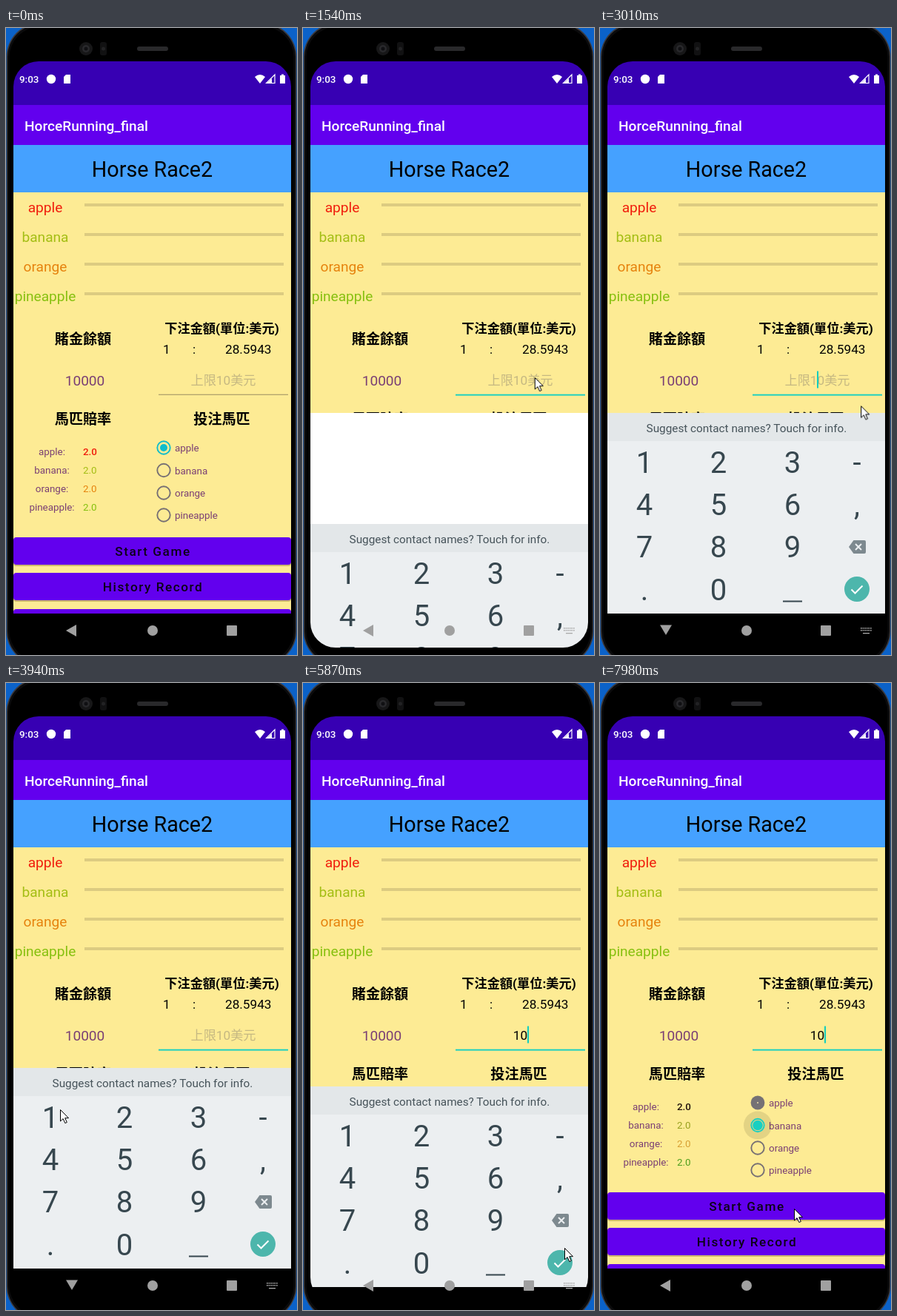
Animation of 393x847 px, one loop 8000 ms. Source, as an HTML page:

```html
<!DOCTYPE html>
<html lang="zh-Hant">
<head>
<meta charset="utf-8">
<title>Horse race</title>
<style>
html, body { margin: 0; width: 100%; height: 100%; overflow: hidden; background: #0b62c9; }
svg { display: block; width: 393px; height: 847px; }
text { font-family: Roboto, "Noto Sans CJK TC", "Noto Sans CJK JP", "Noto Sans CJK", sans-serif; white-space: pre; }
.mid { text-anchor: middle; }
.h1 { font-size: 28.7px; }
.big { font-size: 19.1px; }
.med { font-size: 17.2px; }
.small { font-size: 13.4px; }
.bar { font-size: 15.3px; fill: #46535a; }
.key { font-size: 40px; fill: #37474f; text-anchor: middle; }
.bold { font-weight: 700; }
.half { font-weight: 500; }
.btn { font-size: 17.2px; font-weight: 500; letter-spacing: 1.54px; fill: #0c0218; }
.plum { fill: #7a3f74; }
</style>
</head>
<body>
<svg id="stage" viewBox="0 0 393 847"></svg>
<script>
const LOOP = 8000;
const names = ['apple', 'banana', 'orange', 'pineapple'];
const colors = ['#f01d0c', '#a4be14', '#e6830e', '#86c00f'];
const lateColors = ['#22120c', '#99a11f', '#d8a034', '#4f9f1d'];
const radioY = [567, 597.5, 628, 658];

const text = (x, y, cls, str, extra = '') => `<text x="${x}" y="${y}" class="${cls}" ${extra}>${str}</text>`;
const rect = (x, y, w, h, fill, extra = '') => `<rect x="${x}" y="${y}" width="${w}" height="${h}" fill="${fill}" ${extra}/>`;
const disc = (x, y, r, fill, extra = '') => `<circle cx="${x}" cy="${y}" r="${r}" fill="${fill}" ${extra}/>`;
const path = (d, fill, extra = '') => `<path d="${d}" fill="${fill}" ${extra}/>`;
const group = (id, body, extra = '') => `<g id="${id}" ${extra}>${body}</g>`;
const ring = (y, color) => disc(213, y, 8.7, 'none', `stroke="${color}" stroke-width="1.9"`);

const body = [
  rect(0.5, -7, 392, 868, '#3b3b40', 'rx="46"'),
  rect(2, -5, 389, 864, '#0b0b0c', 'rx="44"'),
  rect(4.5, -2, 384, 858, '#000', 'rx="42"'),
  disc(108, 28, 9, '#171718'), disc(108, 28, 5, '#29292c'), disc(108, 28, 2.5, '#101013'),
  rect(127, 19, 9, 18, '#111112', 'rx="3"'), disc(131.5, 28, 2.5, '#222224'),
  rect(177, 25, 42, 6, '#29292b', 'rx="3"'),
].join('');

const statusBar = [
  rect(10, 45, 375, 59, '#3700b3'),
  text(18, 74, 'small half', '9:03', 'fill="#fff"'),
  disc(61, 69, 6.2, '#fff'),
  path('M81 63h6v12h-9v-9z', '#fff'),
  path('M336 66q7-6 14 0l-7 9z', '#fff'),
  path('M351.500 74.500L363 63v11.500z', 'none', 'stroke="#fff" stroke-width="1.2"'),
  path('M352 75l7-7v7z', '#fff'),
  path('M370 64h2v-1.500h3v1.500h2v11h-7z', '#fff'),
].join('');

const button = (y, label) =>
  rect(10, y + 2, 375, 37, '#b8a35c', 'rx="4" opacity=".7"') +
  rect(10, y, 375, 37, '#6200ee', 'rx="4"') + text(198.5, y + 25, 'btn mid', label);

const content = [
  rect(10, 222, 375, 569, '#fdeb94'),
  rect(10, 104, 375, 54, '#6200ee'),
  text(25, 139, 'big half', 'HorceRunning_final', 'fill="#fff"'),
  rect(10, 158, 375, 64, '#45a1ff'),
  text(197.5, 201, 'h1 mid', 'Horse Race2'),
  names.map((n, i) => text(53, 249 + i * 40, 'big mid', n, `fill="${colors[i]}"`) +
    rect(106, 237 + i * 40, 269, 4, '#dccb81')).join(''),
  text(104, 427, 'big mid bold', '賭金餘額'),
  text(291.5, 412, 'med mid bold', '下注金額(單位:美元)'),
  text(212, 440, 'med', '1'), text(252, 440, 'med', ':'), text(296, 440, 'med', '28.5943'),
  text(106.5, 483, 'big mid plum', '10000'),
  text(293.5, 482, 'med mid', '上限10美元', 'id="hint" fill="#c5b882"'),
  text(293.5, 482, 'med mid', '1', 'id="one"'),
  text(293.5, 482, 'med mid', '10', 'id="ten"'),
  rect(206, 494.7, 175, 1.2, '#aa9d6a', 'id="idleLine"'),
  rect(206, 494.7, 175, 1.9, '#18cfc2', 'id="focusLine"'),
  rect(-1, 463.5, 2, 23, '#12cdbf', 'id="caret"'),
  text(104, 535, 'big mid bold', '馬匹賠率'),
  text(291.5, 535, 'big mid bold', '投注馬匹'),
  names.map((n, i) => text(62, 577 + i * 25.1, 'small mid plum', n + ':') +
    text(104, 577 + i * 25.1, 'small' + (i ? '' : ' half'), '2.0', `id="odd${i}"`) +
    text(228, radioY[i] + 5, 'small plum', n)).join(''),
  ring(628, '#777074'), ring(658, '#777074'),
  group('appleOn', disc(213, 567, 5, 'currentColor') + ring(567, 'currentColor')),
  group('appleOff', disc(213, 567, 9.4, '#757175') + disc(213, 567, 1, '#eee0a8')),
  group('bananaOff', ring(597.5, '#777074')),
  group('bananaOn', disc(213, 597.5, 19, '#000', 'id="ripple" opacity=".1"') +
    disc(213, 597.5, 6.8, '#18cfc2') + ring(597.5, '#18cfc2')),
  button(688, 'Start Game'), button(736, 'History Record'),
  rect(10, 785, 375, 10, '#6200ee', 'rx="4"'),
  rect(10, 791, 375, 50, '#000'),
].join('');

const rowY = [587, 644, 701, 759];
const keyRows = ['123-', '456,', '789', '.0'];
const keyboard = [
  rect(10, 520, 375, 38, '#e3e7e9'), rect(10, 558, 375, 233, '#eceff1'),
  rect(10, 791, 375, 60, '#000'),
  text(198, 546, 'bar mid', 'Suggest contact names? Touch for info.'),
  rect(13, 561, 94, 51, '#cfd5d8', 'id="press1" rx="3"'),
  rect(113, 733, 94, 51, '#cfd5d8', 'id="press0" rx="3"'),
  keyRows.map((row, r) => [...row].map((k, c) =>
    text([60, 160, 260, 347][c], rowY[r] + 14, 'key', k)).join('')).join(''),
  rect(247, 773.5, 26, 2, '#37474f'),
  path('M336 701l6.500-9H357q2 0 2 2v14q0 2-2 2H342.500z', '#7d898f'),
  path('M345 697l8 8m0-8l-8 8', 'none', 'stroke="#eceff1" stroke-width="2"'),
  disc(347, 758, 25, '#cfd5d8', 'id="pressOk"'),
  disc(347, 758, 17, '#4db6ac'),
  path('M339.500 758.500l5 5 10-10', 'none', 'stroke="#fff" stroke-width="2"'),
].join('');

let dots = rect(355, 817, 9, 1.3, '#aaa');
for (let i = 0; i < 12; i++) dots += rect(352 + i % 6 * 2.6, 810 + (i / 6 | 0) * 3, 1.6, 1.6, '#aaa');
const nav = [
  path('M81 814l14-8v16z', '#a0a0a0', 'id="back"'),
  path('M81 806.500h16l-8 13.500z', '#a0a0a0', 'id="down"'),
  disc(198, 814, 7, '#a0a0a0'), rect(298, 807, 14, 14, '#a0a0a0', 'rx="1"'),
  group('keysIcon', dots),
].join('');

document.getElementById('stage').innerHTML =
  `<clipPath id="screen"><rect x="10" y="45" width="375" height="792" rx="34"/></clipPath>` + body +
  `<g clip-path="url(#screen)">${statusBar}${content}` +
  rect(10, 520, 375, 271, '#fff', 'id="blank"') + group('keyboard', keyboard) + nav + '</g>' +
  group('cursor', disc(0, 0, 12, '#ff0', 'id="click" opacity=".47"') +
    path('M.5 .5V16l3.600-3.400 2.700 6 2.500-1.100-2.600-5.800H11.500z', '#fff', 'stroke="#000" stroke-width="1"'));

function run(id, prop, steps, easing = 'step-end') {
  const frames = steps.map(([ms, v]) => ({ offset: ms / LOOP, [prop]: v, easing }));
  if (steps[0][0] > 0) frames.unshift({ ...frames[0], offset: 0 });
  frames.push({ ...frames[frames.length - 1], offset: 1 });
  document.getElementById(id).animate(frames, { duration: LOOP, iterations: Infinity });
}

// Times alternate: shown from, hidden from, shown from ...
const show = (id, ...times) => run(id, 'visibility',
  [[0, 'hidden'], ...times.map((ms, i) => [ms, i % 2 ? 'hidden' : 'visible'])]);
const move = (id, points, easing) =>
  run(id, 'transform', points.map(([ms, x, y]) => [ms, `translate(${x}px, ${y}px)`]), easing);

show('cursor', 140);
move('cursor', [
  [140, 329, 797], [300, 326, 700], [520, 312, 510], [670, 306, 468], [1500, 306, 468],
  [1690, 337, 486], [1780, 337, 486], [1860, 353, 510], [3010, 353, 510],
  [3390, 42, 616], [3560, 42, 616], [3940, 73, 576], [4080, 73, 576],
  [4320, 133, 692], [4400, 150, 730], [4480, 167, 764], [4780, 167, 764],
  [4940, 317, 762], [5020, 317, 762], [5250, 353, 763], [5950, 353, 763],
  [6500, 267, 628], [6640, 267, 628], [6800, 251, 598], [6960, 251, 598],
  [7180, 303, 645], [7340, 293, 679], [7580, 293, 679], [7900, 262, 710],
], 'linear');
show('click', 920, 1070, 4010, 4080, 4720, 4780, 5720, 5790, 6870, 6940);

move('caret', [[0, 294, 0], [4150, 299, 0], [4800, 304, 0]]);
show('caret', 1070, 1540, 2090, 2550, 3010, 3390, 4150, 4720, 4800, 5250, 5720, 6080, 6290, 6570, 7080, 7580, 7900);
show('hint', 0, 4150);
show('one', 4150, 4800);
show('ten', 4800);
show('idleLine', 0, 1070);
show('focusLine', 1070);

show('keyboard', 1540, 6080);
move('keyboard', [[0, 0, 150], [1610, 0, 50], [1690, 0, 12], [1780, 0, 2], [1860, 0, 0],
  [5860, 0, 25], [5930, 0, 100], [6010, 0, 210]]);
show('blank', 1540, 5860);
show('press1', 4080, 4220);
show('press0', 4720, 4870);
show('pressOk', 5720, 5860);
show('keysIcon', 1390, 6010);
show('back', 0, 1780, 5860);
show('down', 1780, 5860);

names.forEach((n, i) => run('odd' + i, 'fill', [[0, colors[i]], [5860, lateColors[i]]]));
run('appleOn', 'color', [[0, '#0fbccb'], [5860, '#22d0c1']]);
show('appleOn', 0, 7820);
show('appleOff', 7820);
show('bananaOff', 0, 7820);
show('bananaOn', 7820);
</script>
</body>
</html>
```
